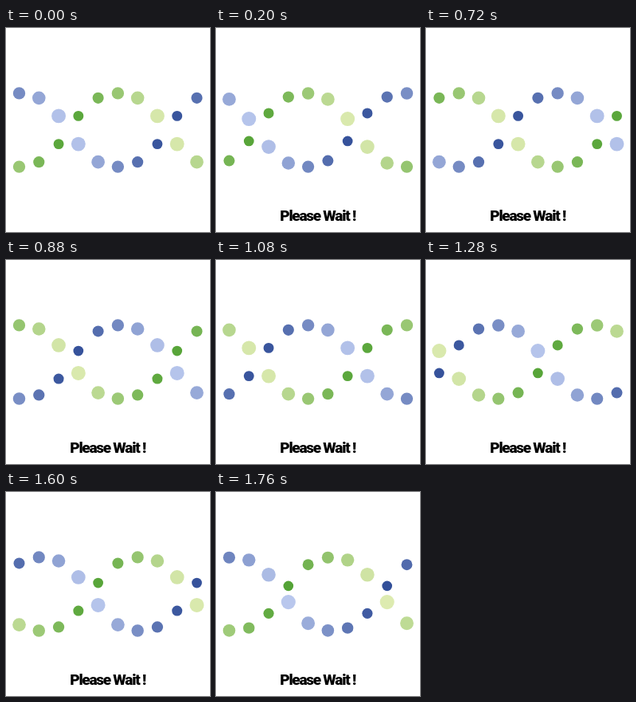
Write an HTML page with a canvas that moves like this. It is 256x256 px and loops after 1800 ms.

```html
<!DOCTYPE html>
<html lang="en">
<head>
<meta charset="utf-8">
<title>Please Wait</title>
<style>
  html, body { margin: 0; width: 100%; height: 100%; overflow: hidden; background: #fff; }
  canvas, svg { position: absolute; left: 0; top: 0; width: 256px; height: 256px; }
  text {
    font: 900 19px Roboto, "Liberation Sans", sans-serif;
    letter-spacing: -1.25px;
    text-anchor: middle;
  }
</style>
</head>
<body>
<canvas id="stage" width="256" height="256"></canvas>
<svg viewBox="0 0 256 256"><text id="label" x="127.6" y="241.5">Please Wait !</text></svg>
<script>
const SIZE = 256, LOOP = 1800, STEP = 40, COLUMNS = 10;
const BLUE = { near: [193, 206, 242], far: [42, 72, 148], shift: 0 };
const GREEN = { near: [229, 239, 184], far: [76, 159, 46], shift: 0.5 };

const ctx = document.getElementById('stage').getContext('2d');
const label = document.getElementById('label');

const wrap = u => u - Math.floor(u);
const mix = (a, b, k) => a + (b - a) * k;
// Linear there and back: 0 at u = 0, 1 at u = 0.5
const tri = u => 1 - Math.abs(1 - 2 * wrap(u));

// cubic-bezier(.5, 0, .5, 1)
function ease(x) {
  let lo = 0, hi = 1;
  for (let i = 0; i < 24; i++) {
    const s = (lo + hi) / 2;
    if (1.5 * s - 1.5 * s * s + s * s * s < x) lo = s; else hi = s;
  }
  return lo * lo * (3 - 2 * lo);
}

function drawStrand({ near, far, shift }, time) {
  for (let i = 0; i < COLUMNS; i++) {
    const u = time / LOOP + i / COLUMNS + shift;
    const depth = tri(u + 0.25);
    const x = SIZE * (2 + 3 * i) / 31;
    const y = SIZE * mix(0.32, 0.68, ease(tri(u)));
    const rgb = far.map((c, k) => Math.round(mix(c, near[k], depth)));
    ctx.fillStyle = `rgb(${rgb})`;
    ctx.beginPath();
    ctx.arc(x, y, SIZE * mix(0.024, 0.036, depth), 0, 2 * Math.PI);
    ctx.fill();
  }
}

function draw(time) {
  ctx.fillStyle = '#fff';
  ctx.fillRect(0, 0, SIZE, SIZE);
  drawStrand(BLUE, time);
  drawStrand(GREEN, time);
  label.style.visibility = time < STEP ? 'hidden' : 'visible';
}

const start = performance.now();
function tick() {
  const now = Math.max(0, performance.now() - start) + 1;
  draw(Math.floor((now % LOOP) / STEP) * STEP);
  requestAnimationFrame(tick);
}
tick();
</script>
</body>
</html>
```
